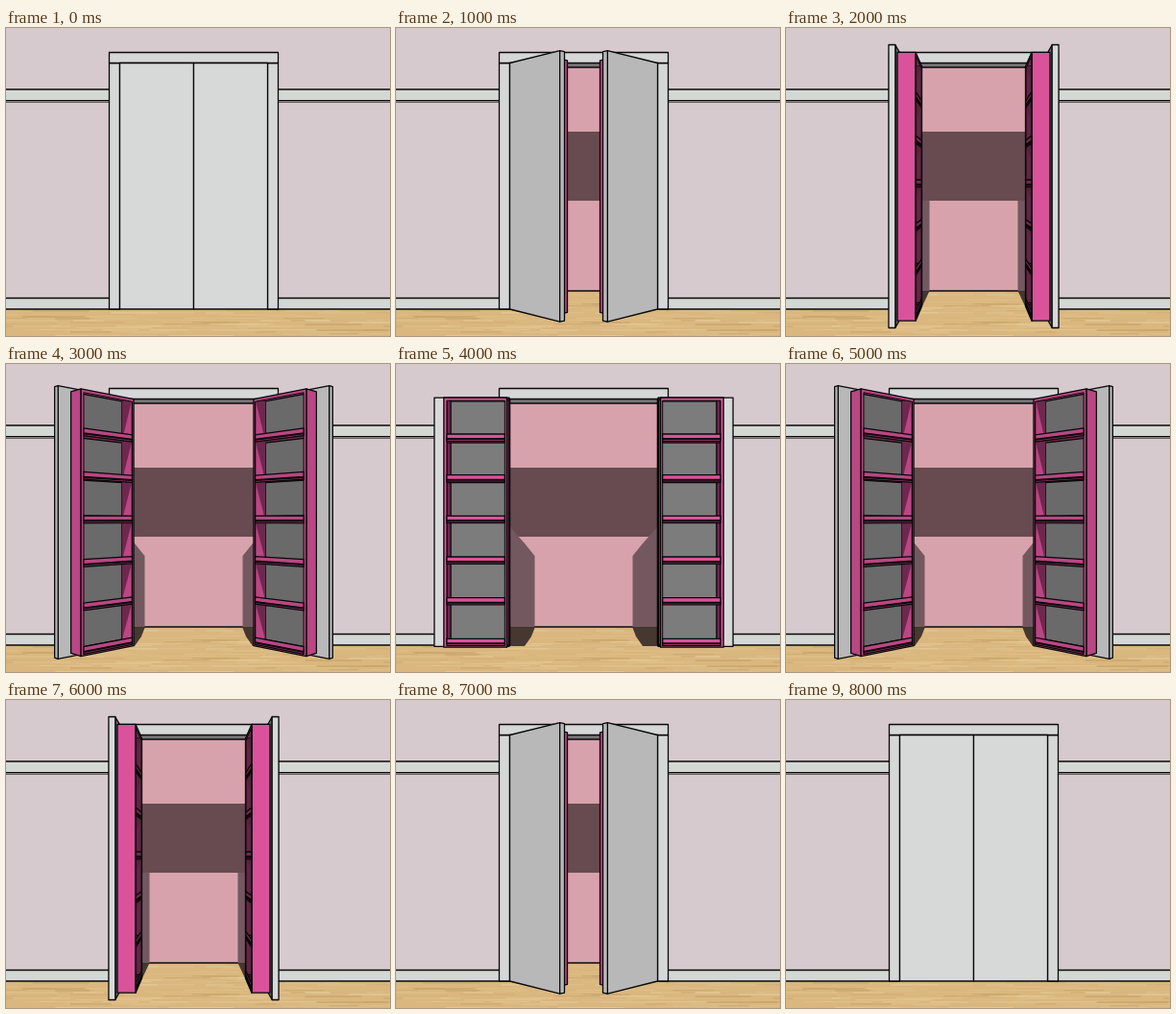
An HTML page with a canvas that plays this animation: 400x321 px, repeating every 9 s.

```html
<!DOCTYPE html>
<html lang="en">
<head>
<meta charset="utf-8">
<title>Cabinet doors</title>
<style>
  html, body { margin: 0; width: 100%; height: 100%; overflow: hidden; background: #d7cacf; }
  canvas { display: block; width: 400px; height: 321px; }
</style>
</head>
<body>
<canvas id="stage" width="400" height="321"></canvas>
<script>
const ctx = document.getElementById('stage').getContext('2d');
const STEP = 1000;
const ANGLES = [0, 45, 90, 135, 180, 135, 90, 45, 0];
const EYE = { x: 195.5, y: 163, dist: 590 };
const HINGE_X = 118.5;
const DOOR = { length: 77, thick: 6, top: 36.5, bottom: 293 };
const RACK = { length: 63, front: 23, top: 40, bottom: 290 };
const SHELVES = [82, 123, 164, 205, 246, 287];
const PINK = [218, 82, 154], GREY = [215, 216, 216], PANEL = [124, 124, 124];
const INK = '#080808';

function shade(color, amount) {
  return `rgb(${color.map(c => Math.round(c * amount)).join()})`;
}

function trace(points) {
  ctx.beginPath();
  points.forEach(([x, y]) => ctx.lineTo(x, y));
  ctx.closePath();
}

function poly(points, fill, stroke = INK, width = 1.3) {
  trace(points);
  ctx.fillStyle = fill;
  ctx.fill();
  if (!stroke) return;
  ctx.strokeStyle = stroke;
  ctx.lineWidth = width;
  ctx.stroke();
}

function rect(x, y, w, h, fill, stroke) {
  poly([[x, y], [x + w, y], [x + w, y + h], [x, y + h]], fill, stroke || null);
}

function line(x1, y1, x2, y2, color = INK, width = 1.3) {
  ctx.beginPath();
  ctx.moveTo(x1, y1);
  ctx.lineTo(x2, y2);
  ctx.strokeStyle = color;
  ctx.lineWidth = width;
  ctx.stroke();
}

function mirrored(draw) {
  draw();
  ctx.save();
  ctx.translate(2 * EYE.x, 0);
  ctx.scale(-1, 1);
  draw();
  ctx.restore();
}

function drawFloor(top, height) {
  ctx.save();
  ctx.beginPath();
  ctx.rect(0, top, 400, height);
  ctx.clip();
  rect(0, top, 400, height, '#dab77e');
  const tones = ['#e5ca98', '#c8a56a', '#dfc28f'];
  let seed = 17;
  const random = () => (seed = seed * 16807 % 2147483647) / 2147483647;
  for (let i = 0; i < 80; i++) {
    ctx.globalAlpha = 0.35 + random() * 0.4;
    rect(random() * 440 - 40, top + 1 + Math.floor(random() * 14) * 2,
      25 + random() * 60, 1 + random(), tones[i % 3]);
  }
  ctx.restore();
}

function drawRoom() {
  rect(0, 0, 400, 293, '#d7cacf');
  rect(0, 64, 400, 12, '#d4d8d5');
  line(0, 64, 400, 64);
  line(0, 75.7, 400, 75.7);
  line(0, 77.3, 400, 77.3, '#6b6266', 1.5);
  rect(0, 281.5, 400, 11.5, '#d4d8d5');
  line(0, 281.5, 400, 281.5);
  drawFloor(293, 28);
  line(0, 293, 400, 293);
}

function drawCloset(angle) {
  const left = HINGE_X, width = 2 * DOOR.length;
  const shadow = '#745860', floorShadow = '#463731';
  ctx.save();
  ctx.beginPath();
  ctx.rect(left, 37, width, 257);
  ctx.clip();
  rect(left, 37, width, 237, '#d8a2ac');
  rect(left, 108, width, 72, '#684b51');
  drawFloor(274, 20);
  line(left, 274, left + width, 274);
  mirrored(() => {
    if (angle === 90) {
      poly([[142, 180], [149.5, 180], [149.5, 274], [142, 274]], shadow, null);
      poly([[135, 303], [142, 275], [149, 275], [142, 290]], floorShadow, null);
    } else if (angle > 90) {
      poly([[119, 170], [134, 187], [144.5, 200], [144.5, 274], [119, 274]], shadow, null);
      poly([[119, 275], [144.5, 275], [141, 284], [134, 294], [119, 294]], floorShadow, null);
    }
  });
  rect(left, 37, width, 4, '#777476');
  line(left, 41, left + width, 41);
  ctx.restore();
}

function drawFrame() {
  mirrored(() => rect(107.5, 36.5, 11, 256.5, '#d6d7d7', INK));
  rect(107.5, 25.5, 176, 11, '#d6d7d7', INK);
}

// e runs along the door from its hinge, n goes through its thickness.
function projector(angle) {
  const a = angle * Math.PI / 180, c = Math.cos(a), s = Math.sin(a);
  const place = (e, n) => ({ x: HINGE_X + e * c + n * s, z: e * s - n * c });
  const project = (e, n, y) => {
    const p = place(e, n), k = EYE.dist / (EYE.dist - p.z);
    return [EYE.x + (p.x - EYE.x) * k, EYE.y + (y - EYE.y) * k];
  };
  return { place, project };
}

function drawDoor(angle) {
  const { place, project } = projector(angle);

  function quad(a, b, top, bottom) {
    return [project(...a, top), project(...b, top), project(...b, bottom), project(...a, bottom)];
  }

  // Vertical face from a to b, visible only when b lies right of a.
  function face(a, b, top, bottom, color, dim = 1) {
    const points = quad(a, b, top, bottom);
    if (points[1][0] - points[0][0] < 0.3) return false;
    const p = place(...a), q = place(...b);
    const facing = (q.x - p.x) / Math.hypot(q.x - p.x, q.z - p.z);
    poly(points, shade(color, (0.5 + 0.5 * facing) * dim));
    return true;
  }

  function slab() {
    const { length: l, thick: t, top, bottom } = DOOR;
    const side = (a, b) => face(a, b, top, bottom, GREY);
    side([0, t], [0, 0]);
    side([l, t], [0, t]);
    side([0, 0], [l, 0]);
    side([l, 0], [l, t]);
  }

  function rack() {
    const { length: l, front: f, top, bottom } = RACK, t = DOOR.thick;
    face([0, f], [0, t], top, bottom, PINK);
    face([l, t], [l, f], top, bottom, PINK);
    if (!face([l, f], [0, f], top, bottom, PINK)) return;
    const dim = angle === 90 ? 0.45 : 1;
    const opening = quad([l - 3, f], [2, f], top + 3, bottom - 3);
    ctx.save();
    trace(opening);
    ctx.clip();
    face([l, t], [0, t], top, bottom, PANEL);
    face([2, t], [2, f], top, bottom, PINK, dim);
    face([l - 3, f], [l - 3, t], top, bottom, PINK);
    const shelfTone = shade(PINK, 0.5 * (angle === 90 ? 0.8 : 1));
    SHELVES.forEach((y, i) => {
      const above = i ? SHELVES[i - 1] : top;
      poly([project(2, t, above), project(2, f, above), project(2, t, y)], shelfTone, null);
      for (const level of [y - 1, y + 1]) {
        poly([project(l, t, level), project(2, t, level), project(2, f, level), project(l, f, level)],
          shelfTone);
      }
    });
    ctx.restore();
    trace(opening);
    ctx.strokeStyle = INK;
    ctx.lineWidth = 1;
    ctx.stroke();
    for (const y of SHELVES) {
      face([l - 3, f], [2, f], y - 5.5, y - 1, PINK);
      face([l - 3, f], [2, f], y - 0.3, y + 1.5, PINK, 0.8);
    }
  }

  if (angle < 90) { rack(); slab(); }
  else { slab(); rack(); }
}

function render(time) {
  const angle = ANGLES[Math.floor(time / STEP) % ANGLES.length];
  drawRoom();
  drawCloset(angle);
  drawFrame();
  mirrored(() => drawDoor(angle));
}

const start = performance.now();
function tick() {
  render(performance.now() - start);
  requestAnimationFrame(tick);
}
ctx.lineJoin = 'round';
tick();
</script>
</body>
</html>
```
